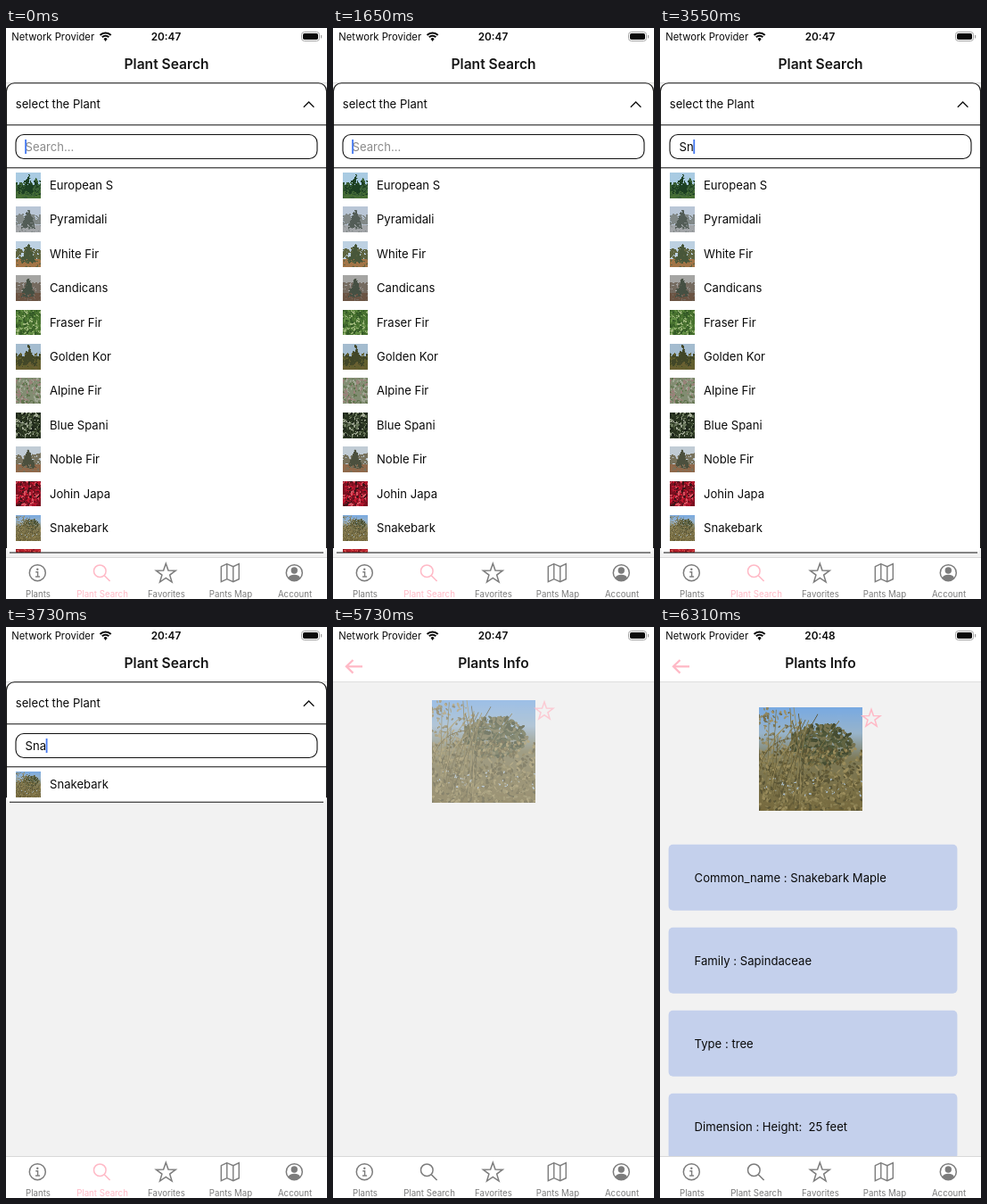
An HTML page with a canvas for the animation above (8670 ms loop, 360 px wide and 640 px high).

```html
<!DOCTYPE html>
<html lang="en">
<head>
<meta charset="utf-8">
<title>Plant Search</title>
<style>
html, body { margin: 0; width: 100%; height: 100%; overflow: hidden; background: #fff; }
canvas { display: block; width: 360px; height: 640px; }
</style>
</head>
<body>
<canvas id="stage"></canvas>
<script>
const W = 360, H = 640, LOOP = 8670;
const PINK = '#ffb9c6', GREY = '#7c7c7c', PAPER = '#f2f2f2', INK = '#0a0a0a';
const BODY = 13.1;
const canvas = document.getElementById('stage');
const dpr = window.devicePixelRatio || 1;
canvas.width = W * dpr;
canvas.height = H * dpr;
const ctx = canvas.getContext('2d');

function rect(x, y, w, h, color) {
  ctx.fillStyle = color;
  ctx.fillRect(x, y, w, h);
}

function roundRect(x, y, w, h, r) {
  ctx.beginPath();
  ctx.roundRect(x, y, w, h, r);
}

function text(str, x, y, size, color = INK, weight = 400, align = 'left') {
  ctx.font = `${weight} ${size}px Inter, Roboto, sans-serif`;
  ctx.textAlign = align;
  ctx.fillStyle = color;
  ctx.fillText(str, x, y);
}

function line(points, color, width = 1) {
  ctx.beginPath();
  points.forEach(([x, y], i) => i ? ctx.lineTo(x, y) : ctx.moveTo(x, y));
  ctx.strokeStyle = color;
  ctx.lineWidth = width;
  ctx.stroke();
}

function circle(x, y, r, color, width) {
  ctx.beginPath();
  ctx.arc(x, y, r, 0, Math.PI * 2);
  if (width) {
    ctx.strokeStyle = color;
    ctx.lineWidth = width;
    ctx.stroke();
  } else {
    ctx.fillStyle = color;
    ctx.fill();
  }
}

// Simplified plant pictures, painted once in a unit square

function random(seed) {
  return () => (seed = (seed * 16807) % 2147483647) / 2147483647;
}

// Scatters soft specks; place() returns the spot of each one
function specks(g, rnd, count, colors, size, place) {
  for (let i = 0; i < count; i++) {
    const [x, y] = place();
    g.fillStyle = colors[i % colors.length];
    g.beginPath();
    g.ellipse(x, y, size * (0.5 + rnd()), size * (0.3 + rnd() * 0.5), rnd() * 3, 0, 7);
    g.fill();
  }
}

const band = (rnd, y0, y1) => () => [rnd(), y0 + rnd() * (y1 - y0)];

const oval = (rnd, x, y, rx, ry) => () => {
  const a = rnd() * Math.PI * 2, d = Math.sqrt(rnd());
  return [x + Math.cos(a) * d * rx, y + Math.sin(a) * d * ry];
};

const cone = (rnd, x, top, bottom, half) => () => {
  const k = Math.sqrt(rnd());
  return [x + (rnd() * 2 - 1) * half * k, top + (bottom - top) * k];
};

const painters = {
  forest(g, rnd, [sky, back, tree, ground]) {
    g.fillStyle = tree;
    g.fillRect(0, 0.5, 1, 0.4);
    g.fillStyle = ground;
    g.fillRect(0, 0.82, 1, 0.18);
    for (let x = 0; x <= 1; x += 0.2) specks(g, rnd, 40, [tree, back], 0.06, cone(rnd, x, 0.2 + rnd() * 0.2, 0.85, 0.16));
    specks(g, rnd, 90, [tree], 0.05, cone(rnd, 0.52, 0.05, 0.85, 0.25));
    specks(g, rnd, 40, [ground, back], 0.05, band(rnd, 0.75, 1));
  },
  single(g, rnd, [sky, back, tree, ground]) {
    specks(g, rnd, 90, [back], 0.07, band(rnd, 0.32, 0.68));
    g.fillStyle = ground;
    g.fillRect(0, 0.7, 1, 0.3);
    specks(g, rnd, 160, [tree], 0.05, cone(rnd, 0.5, 0.1, 0.82, 0.27));
    specks(g, rnd, 30, [ground, back], 0.04, band(rnd, 0.72, 1));
  },
  leaves(g, rnd, colors) {
    specks(g, rnd, 200, colors, 0.06, band(rnd, 0, 1));
  },
  crown(g, rnd) {
    const fade = g.createLinearGradient(0, 0, 0, 1);
    fade.addColorStop(0, '#79aae2');
    fade.addColorStop(0.25, '#98b4cb');
    fade.addColorStop(0.5, '#7e7a57');
    fade.addColorStop(1, '#776a3e');
    g.fillStyle = fade;
    g.fillRect(0, 0, 1, 1);
    const tan = ['#8b8053', '#665d38', '#9b8d5d', '#5a5536', '#7b7145'];
    specks(g, rnd, 200, ['#8f8763', '#777050', '#a0936b'], 0.016, oval(rnd, 0.12, 0.28, 0.32, 0.28));
    specks(g, rnd, 420, ['#626543', '#50583a', '#777350', '#454c32'], 0.025, oval(rnd, 0.61, 0.36, 0.3, 0.2));
    specks(g, rnd, 800, tan, 0.018, band(rnd, 0.4, 1));
    specks(g, rnd, 40, ['#aabdca'], 0.01, band(rnd, 0.68, 0.86));
    g.lineWidth = 0.007;
    for (let i = 0; i < 26; i++) {
      const x = rnd() * 0.5 - 0.05, y = 0.55 + rnd() * 0.4;
      g.strokeStyle = tan[i % 5];
      g.beginPath();
      g.moveTo(x, y);
      g.quadraticCurveTo(x + 0.04, y - 0.3, x + rnd() * 0.5 - 0.1, rnd() * 0.35);
      g.stroke();
    }
  }
};

function makePhoto(kind, colors, seed) {
  const c = document.createElement('canvas');
  c.width = c.height = 232;
  const g = c.getContext('2d');
  g.scale(232, 232);
  g.fillStyle = colors[0];
  g.fillRect(0, 0, 1, 1);
  painters[kind](g, random(seed * 7919 + 11), colors);
  return c;
}

const plants = [
  ['European S', 'forest', ['#a9cbe2', '#3c6237', '#1d4023', '#476f35']],
  ['Pyramidali', 'single', ['#b9c6d6', '#818887', '#535d57', '#a2a5a8']],
  ['White Fir', 'single', ['#bdd1e2', '#5e6440', '#48573a', '#a27547']],
  ['Candicans', 'single', ['#a5a5a3', '#756b60', '#465043', '#6b5443']],
  ['Fraser Fir', 'leaves', ['#48722f', '#638f45', '#345a27', '#98b276']],
  ['Golden Kor', 'forest', ['#a4bccf', '#62602f', '#424728', '#6a6032']],
  ['Alpine Fir', 'leaves', ['#828d72', '#a0a794', '#62754f', '#9a827a']],
  ['Blue Spani', 'leaves', ['#27321f', '#1c241a', '#68765a', '#a0a893', '#39472c']],
  ['Noble Fir', 'single', ['#c1ccd5', '#77725d', '#4c503e', '#8f694b']],
  ['Johin Japa', 'leaves', ['#7c1020', '#c0172e', '#3d1418', '#a6142c', '#d8515f']],
  ['Snakebark', 'crown', ['#79aae2']],
  ['', 'leaves', ['#b5222d', '#d34a48', '#8c1822']]
].map(([name, kind, colors], i) => ({ name, photo: makePhoto(kind, colors, i + 1) }));
const maple = plants[10];

// Icons

function star(x, y, r, color, width) {
  const points = [];
  for (let i = 0; i < 10; i++) {
    const a = -Math.PI / 2 + i * Math.PI / 5, d = i % 2 ? r * 0.4 : r;
    points.push([x + Math.cos(a) * d, y + Math.sin(a) * d]);
  }
  points.push(points[0], points[1]);
  line(points, color, width);
}

const icons = {
  info(x, y, c) {
    circle(x, y, 9, c, 1.5);
    circle(x, y - 4, 1.2, c);
    line([[x - 2, y - 1], [x + 0.3, y - 1], [x + 0.3, y + 4.3]], c, 1.4);
    line([[x - 2.3, y + 4.3], [x + 2.8, y + 4.3]], c, 1.4);
  },
  search(x, y, c) {
    circle(x - 2, y - 2, 6.8, c, 1.5);
    line([[x + 3, y + 3], [x + 9.3, y + 9.3]], c, 1.6);
  },
  star(x, y, c) {
    star(x, y + 1, 11.5, c, 1.5);
  },
  map(x, y, c) {
    line([[x - 10, y - 7], [x - 3.5, y - 10], [x + 3.5, y - 7], [x + 10, y - 10],
      [x + 10, y + 7], [x + 3.5, y + 10], [x - 3.5, y + 7], [x - 10, y + 10],
      [x - 10, y - 7], [x - 3.5, y - 10]], c, 1.4);
    line([[x - 3.5, y - 10], [x - 3.5, y + 7]], c, 1.4);
    line([[x + 3.5, y - 7], [x + 3.5, y + 10]], c, 1.4);
  },
  account(x, y, c) {
    circle(x, y, 9, c, 1.5);
    circle(x, y - 2.7, 3.7, c);
    ctx.beginPath();
    ctx.ellipse(x, y + 5.5, 6.5, 3.5, 0, 0, Math.PI * 2);
    ctx.fill();
  }
};

const tabs = [['Plants', 'info'], ['Plant Search', 'search'], ['Favorites', 'star'], ['Pants Map', 'map'], ['Account', 'account']];

function tabBar(active) {
  rect(0, 593, W, 47, '#fff');
  rect(0, 593, W, 1, '#d9d9d9');
  tabs.forEach(([label, icon], i) => {
    const x = 36 + i * 72, color = i === active ? PINK : GREY;
    icons[icon](x - 0.7, 610.7, color);
    text(label, x, 637.5, 9.7, color, 400, 'center');
  });
}

function statusBar(clock) {
  text('Network Provider', 6.3, 14, 11.25);
  text(clock, 179.5, 14, 11.8, INK, 600, 'center');
  ctx.strokeStyle = INK;
  ctx.lineWidth = 2;
  for (const r of [8.6, 5.3]) {
    ctx.beginPath();
    ctx.arc(111.6, 14, r, -Math.PI * 0.75, -Math.PI * 0.25);
    ctx.stroke();
  }
  ctx.beginPath();
  ctx.moveTo(111.6, 15);
  ctx.arc(111.6, 14.2, 2.9, -Math.PI * 0.75, -Math.PI * 0.25);
  ctx.fillStyle = INK;
  ctx.fill();
  roundRect(331.5, 4.5, 20, 10, 3);
  ctx.strokeStyle = '#a2a2a2';
  ctx.lineWidth = 1;
  ctx.stroke();
  roundRect(333, 6, 17, 7, 1.8);
  ctx.fillStyle = INK;
  ctx.fill();
  rect(353, 8, 1.2, 3.4, '#a2a2a2');
}

function header(title, clock) {
  rect(0, 0, W, 61, '#fff');
  rect(0, 61, W, 1, '#dedede');
  statusBar(clock);
  text(title, 180, 46, 15.6, '#151515', 600, 'center');
}

// Search screen

const typing = [[3110, 'S'], [3550, 'Sn'], [3730, 'Sna'], [4210, 'Snak']];

function typedAt(t) {
  return typing.reduce((s, [at, value]) => t >= at ? value : s, '');
}

function caretAlpha(t) {
  if (t >= 3110) return (t >= 5050 && t < 5190) || t >= 5450 ? 0 : 1;
  const p = (t - 630 + 1005) % 1005;
  return p < 500 ? 1 : Math.abs(p - 752) / 253;
}

function searchField(t) {
  const typed = typedAt(t);
  roundRect(11, 119.5, 338, 27, 9);
  ctx.strokeStyle = '#111';
  ctx.lineWidth = 1.1;
  ctx.stroke();
  if (typed === 'Snak') rect(19, 122, 34.5, 20, '#c8daf3');
  text(typed || 'Search...', 21.5, 138, BODY, typed ? INK : '#8b8b8b');
  const x = typed ? 21.5 + ctx.measureText(typed).width : 21.5;
  ctx.globalAlpha = caretAlpha(t);
  rect(x - 0.3, 125, 1.8, 16, '#4478f0');
  ctx.globalAlpha = 1;
}

function row(plant, i) {
  const y = 162 + i * 38.4;
  ctx.drawImage(plant.photo, 10.6, y, 28.8, 28.8);
  text(plant.name, 49, y + 19, BODY);
}

function searchScreen(t) {
  const filtered = t >= 3730;
  const top = 61.7, bottom = filtered ? 196.2 : 588;
  header('Plant Search', '20:47');
  roundRect(0.5, top, 359, bottom - top, [9, 9, 6, 6]);
  ctx.fillStyle = '#fff';
  ctx.fill();

  ctx.save();
  ctx.beginPath();
  ctx.rect(0, 157, W, bottom - 157);
  ctx.clip();
  if (t >= 5190) rect(1, 157, 358, 39, '#f3f3f3');
  (filtered ? [maple] : plants).forEach(row);
  ctx.restore();

  ctx.beginPath();
  ctx.moveTo(0.5, bottom - 5);
  ctx.arcTo(0.5, top, 9.5, top, 9);
  ctx.arcTo(359.5, top, 359.5, top + 9, 9);
  ctx.lineTo(359.5, bottom - 5);
  ctx.strokeStyle = '#111';
  ctx.lineWidth = 1.1;
  ctx.stroke();
  for (const y of [108.7, 156.7]) line([[0, y], [W, y]], '#111', 1.1);
  line([[4, bottom], [356, bottom]], '#111', 1.1);

  text('select the Plant', 10.8, 90, BODY);
  line([[333.8, 88.8], [339.6, 83], [345.4, 88.8]], '#111', 1.3);
  searchField(t);
  tabBar(1);
}

// Detail screen

const facts = ['Common_name : Snakebark Maple', 'Family : Sapindaceae', 'Type : tree', 'Dimension : Height:  25 feet'];

function infoScreen(t) {
  const loaded = t >= 5830;
  const y = loaded ? 90.3 : 82;
  header('Plants Info', t >= 6310 ? '20:48' : '20:47');
  line([[33, 44.3], [15, 44.3]], PINK, 2.3);
  line([[22.5, 37], [15, 44.3], [22.5, 51.6]], PINK, 2.3);

  ctx.globalAlpha = loaded ? 1 : t >= 5730 ? 0.7 : 0.35;
  ctx.drawImage(maple.photo, 111.2, y, 115.4, 115.2);
  star(237, y + 12.5, 10.4, PINK, 1.5);
  ctx.globalAlpha = 1;

  if (loaded) facts.forEach((fact, i) => {
    const top = 243.8 + i * 93;
    roundRect(9.6, top, 323.8, 74, 5);
    ctx.fillStyle = '#c4d0ec';
    ctx.fill();
    text(fact, 38.6, top + 41.8, BODY);
  });
  tabBar(-1);
}

const start = performance.now();

function draw(now) {
  const t = Math.max(0, now - start) % LOOP;
  ctx.setTransform(dpr, 0, 0, dpr, 0, 0);
  rect(0, 0, W, H, PAPER);
  if (t < 5620) searchScreen(t);
  else infoScreen(t);
  requestAnimationFrame(draw);
}
draw(start);
</script>
</body>
</html>
```
